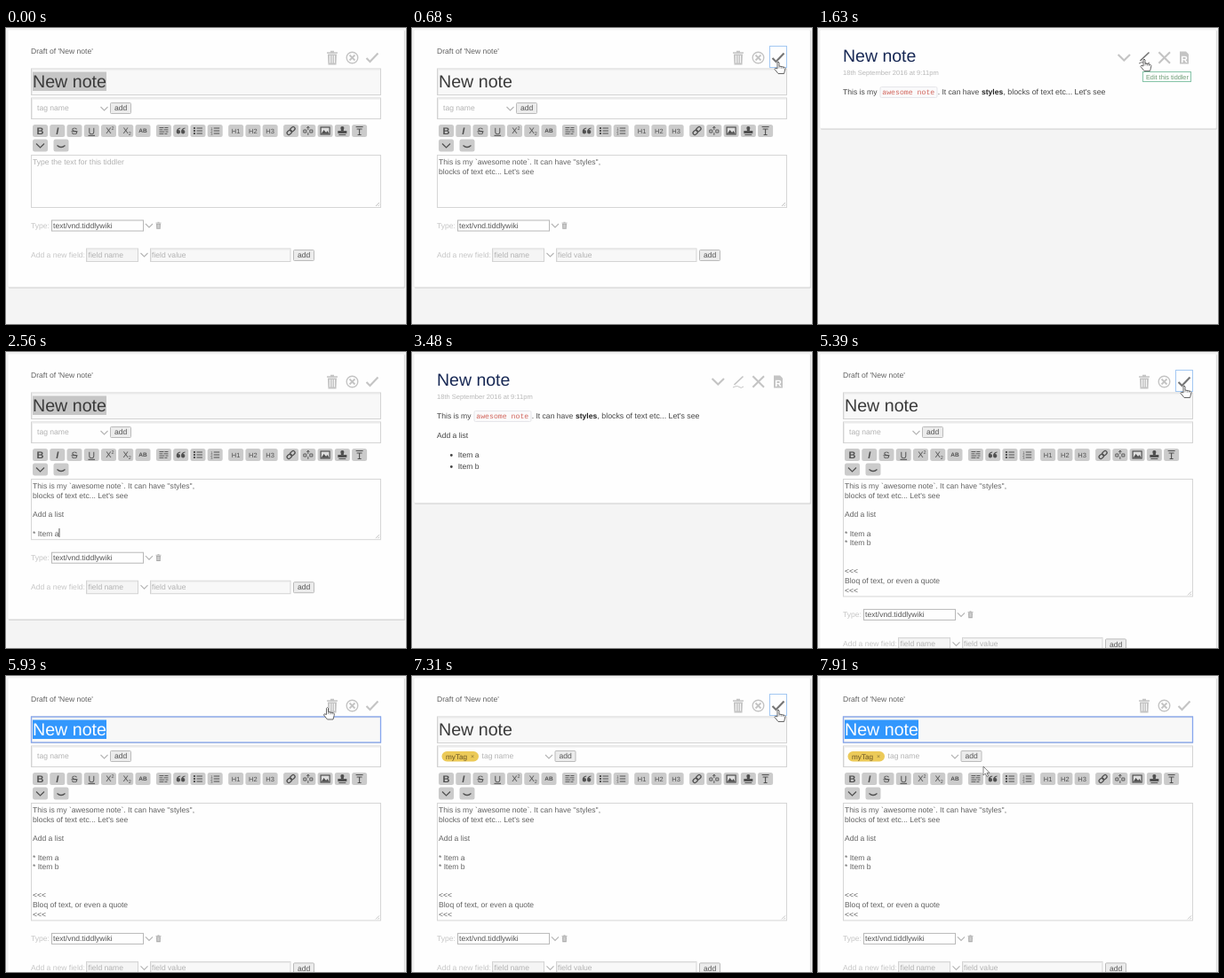
Animation, 450 px wide and 334 px high, one loop 8000 ms. Source, as an HTML page:

```html
<!DOCTYPE html>
<html lang="en">
<head>
<meta charset="utf-8">
<title>New note</title>
<style>
  html, body { margin: 0; width: 100%; height: 100%; overflow: hidden; background: #f4f4f4; }
  svg { display: block; font-family: "Liberation Sans", Arial, sans-serif; text-rendering: geometricPrecision; }
  text { white-space: pre; }
</style>
</head>
<body>
<svg id="stage" width="450" height="334" viewBox="0 0 450 334"></svg>
<script>
const LOOP = 8000, FONT = 8.57, LINE = 10.7;
const GREY = '#c4c4c4', DARK = '#757575', INK = '#626262', STRONG = '#444', FAINT = '#b2b2b2', PALE = '#c6c6c6';
const stage = document.getElementById('stage');
const ruler = document.createElement('canvas').getContext('2d');
ruler.font = `${FONT}px "Liberation Sans", Arial, sans-serif`;

// ---- Note contents -------------------------------------------------
const intro = "This is my `awesome note`. It can have ''styles'',\nblocks of text etc... Let's see";
const oneItem = intro + '\n\nAdd a list\n\n* Item a';
const twoItems = oneItem + '\n* Item b';
const quoteText = 'Bloq of text, or even a quote';
const quoted = words => twoItems + '\n\n\n<<<\n' + words + '\n<<<';
const quoteCaret = words => quoted(words).length - 4;

// ---- Timeline: each step patches the state before it ----------------
const hand = (x, y) => ({ shape: 'hand', x, y });
const arrow = (x, y) => ({ shape: 'arrow', x, y });
const beam = (x, y) => ({ shape: 'beam', x, y });
const overCheck = { mouse: hand(412, 38), hover: 'check' };
const overPencil = { mouse: hand(367, 35), hover: 'pencil' };
const pressCheck = { ...overCheck, press: 'check', title: 'plain', caret: -1 };
const pressPencil = { ...overPencil, press: 'pencil', tip: false };
const view = { view: true, press: '', hover: 'file' };
const edit = { view: false, press: '', title: 'active', hover: '', mouse: hand(361.5, 35.5), caret: -1 };

const steps = [[0, { view: false, text: '', caret: -1, title: 'idle', tagged: false, tagInput: '',
  mouse: null, hover: '', press: '', tip: false, quote: false, list: false }]];
const at = (ms, ...patches) => steps.push([ms, Object.assign({}, ...patches)]);

for (let i = 1; i <= 6; i++) {
  const count = Math.round(intro.length * i / 6);
  at(70 + (i - 1) * 76, { text: intro.slice(0, count), caret: count });
}
at(530, overCheck);
at(680, pressCheck);
at(830, view);
at(1000, { mouse: hand(413, 40) });
at(1170, overPencil);
at(1630, { tip: true });
at(1710, pressPencil);
at(1860, edit);
at(1940, { mouse: beam(150.5, 178) });
at(2170, { title: 'idle' });
at(2400, { mouse: null });
at(2560, { text: oneItem, caret: oneItem.length });
at(2870, { caret: -1, mouse: beam(150.5, 171) });
at(3030, pressCheck, { text: twoItems });
at(3190, view, { list: true });
at(3260, { mouse: arrow(413, 47), hover: '' });
at(3400, { mouse: arrow(418, 53) });
at(3480, { mouse: null });
at(4100, overPencil);
at(4180, pressPencil);
at(4260, edit);
at(4330, { mouse: arrow(250, 120) });
at(4400, { mouse: beam(115.5, 217) });
at(4480, { title: 'idle', caret: twoItems.length });
at(4630, { text: twoItems + '\n', caret: twoItems.length + 1 });
at(4790, { text: twoItems + '\n\n', caret: twoItems.length + 2 });
at(4870, { text: quoted(''), caret: quoteCaret('') });
at(5250, { text: quoted('Bloq of text, '), caret: quoteCaret('Bloq of text, ') });
at(5320, { text: quoted(quoteText), caret: quoteCaret(quoteText), mouse: null });
at(5390, pressCheck);
at(5540, view, { quote: true });
at(5620, { mouse: hand(390, 37), hover: 'cross' });
at(5700, overPencil);
at(5780, pressPencil);
at(5850, edit);
at(6010, { mouse: arrow(215, 62) });
at(6090, { mouse: beam(75, 91) });
at(6170, { title: 'idle', tagInput: 'my', mouse: null });
at(6560, { tagInput: 'myTa' });
at(6730, { tagInput: 'myTag', mouse: arrow(150, 110) });
at(6810, { mouse: arrow(147, 97) });
at(6890, { mouse: hand(139, 83) });
at(6970, { tagged: true, tagInput: '', mouse: beam(139, 90) });
at(7140, overCheck);
at(7310, pressCheck);
at(7390, view);
at(7460, { mouse: hand(390, 37), hover: 'cross' });
at(7540, overPencil);
at(7620, pressPencil);
at(7770, edit);
at(7850, { mouse: arrow(270, 70) });
at(7910, { mouse: arrow(186, 102) });

// ---- Drawing helpers -------------------------------------------------
const escapeText = s => s.replace(/&/g, '&amp;').replace(/</g, '&lt;');
const text = (s, x, y, fill = INK, size = FONT, extra = '') =>
  `<text x="${x}" y="${y}" fill="${fill}" font-size="${size}" ${extra}>${escapeText(s)}</text>`;
const rect = (x, y, w, h, fill, extra = '') =>
  `<rect x="${x}" y="${y}" width="${w}" height="${h}" fill="${fill}" ${extra}/>`;
const line = (d, color, width = 1, extra = '') =>
  `<path d="${d}" fill="none" stroke="${color}" stroke-width="${width}" ${extra}/>`;
const solid = (d, fill) => `<path d="${d}" fill="${fill}"/>`;
const place = (x, y, body, scale = 1) => `<g transform="translate(${x} ${y}) scale(${scale})">${body}</g>`;
const frame = (x, y, w, h, fill, color) => rect(x + .5, y + .5, w - 1, h - 1, fill, `stroke="${color}"`);
const inset = (x, y, w, h, fill) => frame(x, y, w, h, fill, '#d4d4d4') +
  line(`M${x + 1.5} ${y + h - 1}V${y + 1.5}H${x + w - 1}`, '#ececec');
const chevron = (x, y) => line(`M${x - 4} ${y - 2}l4 4 4-4`, '#b4b4b4', 1.1);
const addButton = (x, y) =>
  rect(x + .5, y + .5, 23, 12, '#ececec', 'rx="1" stroke="#bbb"') + text('add', x + 5, y + 9.3, '#555');

const icons = {
  trash: c => line('M-6-5.5H6M-2-7H2', c, 1.5) + solid('M-5-4H5L4.5 8H-4.5Z', c) +
    line('M-2.5-2.5V6M0-2.5V6M2.5-2.5V6', '#fff', .9),
  cancel: c => `<circle r="6.3" fill="none" stroke="${c}" stroke-width="1.4"/>` +
    line('M-3-3L3 3M3-3L-3 3', c, 1.8),
  check: c => line('M-6.5 .5L-2.5 4.5L6.5-5', c, 2.1),
  more: c => line('M-6.7-3.5L0 3L6.7-3.5', c, 2.1),
  pencil: c => line('M-4.5 3.5L5.5-6', c, 1.7) + line('M-6 6.5Q-1 4 1 6T6 5.5', c),
  cross: c => line('M-6.3-6.3L6.3 6.3M6.3-6.3L-6.3 6.3', c, 2.1),
  file: c => solid('M-5-7H2L5-4V7H-5Z', c) +
    text('R', 0, 5, '#fff', 10.5, 'font-weight="bold" text-anchor="middle"')
};

const cursors = {
  hand: '<path d="M-1 1Q0-1 1 1V5L7 6.3Q8.3 7 7.7 9L6.5 13.5H0L-4 8.5Q-4 6.3-1 8Z" fill="#fff" stroke="#555" stroke-width=".9"/>' +
    line('M1 5V7.5M3.3 5.5V8M5.5 6V8', '#666', .6),
  arrow: '<path d="M0 0V10L2.3 8L4 11.5L5.6 10.8L4 7.3H7Z" fill="#fff" stroke="#666" stroke-width=".8"/>',
  beam: line('M-2-5Q0-5 0-4Q0-5 2-5M0-4V4M-2 5Q0 5 0 4Q0 5 2 5', '#666', .9)
};

const card = bottom =>
  rect(3, 3, 446, bottom - 1.3, '#d2d2d2', 'rx="1" opacity=".8"') +
  rect(2, 2, 446, bottom - 1.7, '#fefefe', 'rx="1" stroke="#e8e8e8" stroke-width=".6"');

function headerIcons(state, entries) {
  return entries.map(([name, x]) =>
    (state.press === name ? frame(x - 10, 20, 20, 25, 'none', '#a3c8f2') : '') +
    place(x, 33.5, icons[name](state.hover === name ? DARK : GREY))).join('');
}

const pill = (x, y) => rect(x, y, 41.5, 11.5, '#ecca58', 'rx="5.7"') +
  text('myTag', x + 4.5, y + 8.6, '#6a5424', 8.2) + text('×', x + 32.5, y + 8.4, '#8a7436', 7);

// ---- Toolbar ---------------------------------------------------------
const TOOL = '#505050';
const label = (s, size = 8, extra = '') => text(s, 0, size * .36, TOOL, size, `text-anchor="middle" ${extra}`);
const mark = (d, width = 1) => line(d, TOOL, width);
const quoteMark = 'M-.5-3.5Q-5-3-5 1A2.2 2.2 0 1 0-2.8-1Q-2.5-2.5-.5-2.6Z';
const rows = 'M-1.5-3H5M-1.5 0H5M-1.5 3H5';
const linkRing = x => rect(x, -2, 6, 4, 'none', `rx="2" stroke="${TOOL}" stroke-width="1.3"`);
const groups = [
  [label('B', 11, 'font-weight="bold"'), label('I', 11, 'font-weight="bold" font-style="italic"'),
   label('S', 10.5, 'text-decoration="line-through"'), label('U', 10.5, 'text-decoration="underline"'),
   label('X', 9.5) + text('2', 3, -1, TOOL, 5.5), label('X', 9.5) + text('2', 3, 4.5, TOOL, 5.5),
   label('AB', 6.5, 'font-weight="bold"')],
  [mark('M-5-3.5H0M1-3.5H5M-5-1.2H-1M0-1.2H5M-5 1.1H1M2 1.1H5M-5 3.4H0M1 3.4H4', .9),
   solid(quoteMark, TOOL) + place(5.3, 0, solid(quoteMark, TOOL)),
   mark(rows) + solid('M-5-4h2v2h-2zM-5-1h2v2h-2zM-5 2h2v2h-2z', TOOL),
   mark(rows) + text('1', -5, -1, TOOL, 4) + text('2', -5, 2, TOOL, 4) + text('3', -5, 5, TOOL, 4)],
  ['H1', 'H2', 'H3'].map(s => label(s, 7.5)),
  [`<g transform="rotate(-45)">${linkRing(-5.5)}${linkRing(-.5)}</g>`,
   mark('M-5-1H-2V2H-5ZM2-1H5V2H2ZM0-5V-1M0 2V5M-1.5-3L0-5L1.5-3', .9),
   rect(-5, -4, 10, 8, '#ddd', `stroke="${TOOL}" stroke-width="1.2"`) + solid('M-4.5 3.5L-1.5-1L1 2L2.5 0L4.5 3.5Z', TOOL),
   solid('M-1.5-1Q-3-5 0-5T1.5-1V0H5V3H-5V0H-1.5ZM-4 4H4V5H-4Z', TOOL),
   mark('M-4-4.5H4M-3-2H3M0-2V4.5M-2 4.5H2', 1.1)]
];
const tool = (x, y, body) => rect(x - 8.5, y - 7, 17, 14, '#cbcbcb', 'rx="2.5"') + place(x, y, body);
function buildToolbar() {
  let x = 38.5, out = '';
  for (const group of groups) {
    for (const body of group) { out += tool(x, 116, body); x += 19.25; }
    x += 4.2;
  }
  return out + tool(38.5, 132.5, mark('M-4.5-2L0 2.5L4.5-2', 1.2)) +
    tool(62, 132.5, mark('M-4.5 0Q0 4 4.5 0', 1.2));
}
const toolbar = buildToolbar();

// ---- The two screens --------------------------------------------------
function titleField(mode) {
  const active = mode === 'active';
  const highlight = { active: '#3297fd', idle: '#c6c6c6' }[mode];
  return inset(28, 45.5, 394, 30.5, '#f8f8f8') +
    (active ? rect(28.5, 46, 393, 29, 'none', 'stroke="#86a6ee" stroke-width="1.3"') : '') +
    (highlight ? rect(30, 49.5, 83, 21.5, highlight) : '') +
    text('New note', 30, 67, active ? '#fff' : '#3a3a3a', 19.65);
}

function textArea(state, height) {
  const lines = state.text.split('\n');
  let out = frame(28, 143, 394, height, '#fefefe', '#d6d6d6') +
    line(`M${416} ${141 + height}l4-4M${418.5} ${141 + height}l1.5-1.5`, '#aaa', .7);
  out += state.text
    ? lines.map((s, i) => text(s, 30, 154 + i * LINE)).join('')
    : text('Type the text for this tiddler', 30, 154, FAINT);
  if (state.caret >= 0) {
    const before = state.text.slice(0, state.caret).split('\n');
    const x = 30 + ruler.measureText(before.at(-1)).width;
    out += rect(x, 145.5 + (before.length - 1) * LINE, .9, 10, '#444');
  }
  return out;
}

function editScreen(state) {
  const height = Math.max(60, state.text.split('\n').length * LINE + 5);
  const shift = state.tagged ? 43.5 : 0;
  return card(292 + height - 60) +
    text("Draft of 'New note'", 28, 29) +
    headerIcons(state, [['trash', 367], ['cancel', 389.5], ['check', 412]]) +
    titleField(state.title) +
    inset(28, 78.5, 394, 24.5, '#fefefe') +
    (state.tagged ? pill(33.5, 85) : '') +
    text(state.tagInput || 'tag name', 35 + shift, 93.3, state.tagInput ? INK : FAINT) +
    chevron(110.5 + shift, 91) + addButton(117 + shift, 84) +
    toolbar + textArea(state, height) +
    place(0, height - 60,
      text('Type:', 28, 226, PALE) + frame(51, 216.5, 104, 13, '#fefefe', '#b8b8b8') +
      text('text/vnd.tiddlywiki', 53, 226, '#555') + chevron(161, 223) +
      place(171.5, 222.8, icons.trash('#a8a8a8'), .5) +
      text('Add a new field:', 28, 259, PALE) +
      inset(90, 248.5, 59, 15.5, '#f5f5f5') + text('field name', 92.5, 259, FAINT) +
      chevron(155.5, 256) +
      inset(162, 248.5, 158.5, 15.5, '#f8f8f8') + text('field value', 164, 259, FAINT) +
      addButton(323, 250));
}

function viewScreen(state) {
  const bottom = state.quote ? 192 : state.list ? 170 : 113;
  const shift = state.tagged ? 21 : 0;
  let body = text('This is my', 28, 75.3, STRONG) +
    rect(70, 66.5, 64, 12, '#fafafb', 'rx="1.5" stroke="#e6e6ea"') +
    text('awesome note', 72.3, 75.3, '#d2655c', 8.2, 'font-family="Liberation Mono, monospace"') +
    text('. It can have', 134.7, 75.3, STRONG) +
    text('styles', 183.9, 75.3, '#222', FONT, 'font-weight="bold"') +
    text(", blocks of text etc... Let's see", 208.4, 75.3, STRONG, 8.8);
  if (state.list) {
    body += text('Add a list', 28, 97.1, STRONG);
    ['Item a', 'Item b'].forEach((item, i) => {
      const y = 119.3 + i * 13;
      body += `<circle cx="44.3" cy="${y - 2.8}" r="1.4" fill="#444"/>` + text(item, 51.7, y, STRONG);
    });
  }
  if (state.quote) body += rect(43, 145.5, 3, 13, '#bbb') + text(quoteText, 52, 155, STRONG);
  return card(bottom + shift) +
    text('New note', 28, 38.4, '#182955', 19.5) +
    text('18th September 2016 at 9:11pm', 28, 53.3, '#b8b8b8', 7.55) +
    headerIcons(state, [['more', 344.3], ['pencil', 367], ['cross', 389.7], ['file', 412]]) +
    (state.tagged ? pill(28, 61) : '') + place(0, shift, body) +
    (state.tip ? frame(365, 49, 55, 12, '#fefefe', '#86c4a8') + text('Edit this tiddler', 369, 57.5, '#6a9a72', 7.3) : '');
}

// ---- Playback ----------------------------------------------------------
let shown = -1;
function render(now) {
  const time = now % LOOP;
  const current = steps.findLastIndex(([ms]) => ms <= time);
  if (current !== shown) {
    shown = current;
    const state = Object.assign({}, ...steps.slice(0, current + 1).map(step => step[1]));
    const { mouse } = state;
    stage.innerHTML = rect(0, 0, 450, 334, '#f4f4f4') +
      (state.view ? viewScreen(state) : editScreen(state)) +
      (mouse ? place(mouse.x, mouse.y, cursors[mouse.shape]) : '');
  }
}
const start = performance.now();
function tick() {
  render(performance.now() - start);
  requestAnimationFrame(tick);
}
tick();
</script>
</body>
</html>
```
